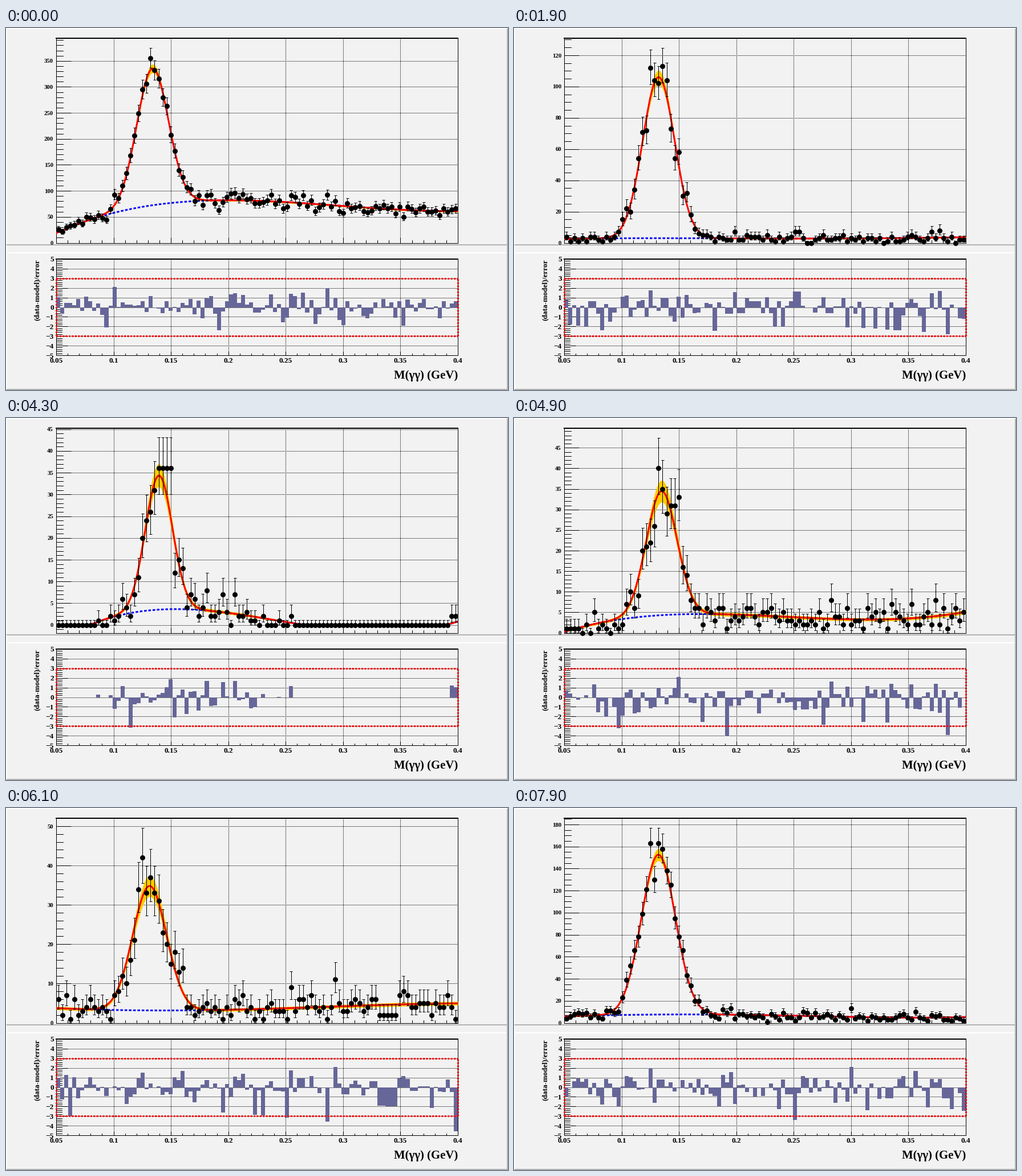
These frames come from a looping animation (880 px wide and 636 px high, 8000 ms). A matplotlib script:

```python
import matplotlib.pyplot as plt
import numpy as np
from matplotlib.animation import FuncAnimation
from matplotlib.patches import Rectangle

W, H, DPI = 880, 636, 100
PX = 72 / DPI
LEFT, RIGHT = 88, 792
TOP, BOTTOM = 18, 377.5
PULL_TOP, PULL_BOTTOM = 406, 575
XMIN, XMAX, BINS = 0.05, 0.4, 100
DOTS = (0, (1, 2))

# picture: tallest count, peak mean, width and height,
# then the background at five evenly spaced masses
FITS = {
    0: (355, 0.1340, 0.0138, 263, 19, 73.5, 81, 69, 61),
    7: (113, 0.1323, 0.0139, 103, 2.5, 3, 2.8, 2.9, 3.6),
    11: (48, 0.1392, 0.0141, 40.2, 1.6, 0.6, 0.1, 0.05, 0.2),
    15: (36, 0.1395, 0.0118, 30.8, -4, 3.5, 1.8, -1.5, 0.8),
    19: (45, 0.1303, 0.0150, 29.5, 4.5, 5.2, 6.5, 8, 9.4),
    23: (38, 0.1326, 0.0144, 33.8, 3, 1.1, 0.5, 0.7, 0.5),
    27: (163, 0.1321, 0.0148, 145, 6, 7.6, 7, 5.2, 5.3),
}

plt.rcParams["font.family"] = "Liberation Serif"
plt.rcParams["font.weight"] = "bold"
fig = plt.figure(figsize=(W / DPI, H / DPI), dpi=DPI, facecolor="#f2f2f2")
ax = fig.add_axes([0, 0, 1, 1])
ax.set(xlim=(0, W), ylim=(H, 0))
ax.axis("off")
top_frame = Rectangle((LEFT, TOP), RIGHT - LEFT, BOTTOM - TOP,
                      transform=ax.transData)

edges = np.linspace(XMIN, XMAX, BINS + 1)
centers = (edges[1:] + edges[:-1]) / 2
mass = np.linspace(XMIN, XMAX, 400)


def to_x(m):
    return LEFT + (np.asarray(m) - XMIN) / (XMAX - XMIN) * (RIGHT - LEFT)


def pull_y(v):
    return PULL_BOTTOM - (np.asarray(v) + 5) / 10 * (PULL_BOTTOM - PULL_TOP)


def line(x, y, width=1, color="black", z=2, **kw):
    return ax.plot(x, y, color=color, lw=width * PX, zorder=z,
                   dash_capstyle="butt", **kw)[0]


def grid_line(x, y):
    return line(x, y, ls=DOTS, z=1, antialiased=False)


def label(x, y, text, size, ha="right"):
    return ax.text(x, y, text, fontsize=size * PX, ha=ha, va="baseline")


def fit(picture):
    tallest, mean, sigma, height, *anchors = (
        np.interp(picture, list(FITS), column)
        for column in zip(*FITS.values()))
    poly = np.polyfit(np.arange(5), anchors, 4)

    def evaluate(m):
        background = np.polyval(poly, (m - XMIN) / (XMAX - XMIN) * 4)
        peak = np.exp(-((m - mean) / sigma) ** 2 / 2)
        error = (0.4 * np.sqrt(height) * peak
                 + 0.22 * np.sqrt(np.maximum(background, 0)))
        return background, background + height * peak, error

    return round(tallest), evaluate


def sample(picture, expected, tallest):
    rng = np.random.default_rng(100 + picture)
    counts = np.minimum(rng.poisson(expected), tallest)
    counts[counts.argmax()] = tallest
    return counts


def tick_step(span):
    power = 10 ** np.floor(np.log10(span / 10))
    step = next(s * power for s in (1, 2, 5, 10) if span / (s * power) <= 10)
    parts = 4 if round(step / power) == 2 else 5
    return step, parts


def draw_borders():
    light, shade = "white", "#b2b2b2"
    for x, y, w, h, color in ((0, 0, W, 2, light),
                              (0, 394, W, 2, light),
                              (0, 0, 2, H, light),
                              (1, 379.5, W - 1, 2, shade),
                              (1, H - 2, W - 1, 2, shade),
                              (W - 2, 1, 2, H, shade)):
        ax.add_patch(Rectangle((x, y), w, h, color=color, lw=0, zorder=0))


def draw_frame(top, bottom, major, minor):
    line([LEFT, RIGHT, RIGHT, LEFT, LEFT], [bottom, bottom, top, top, bottom])
    line([LEFT, RIGHT], [top, top], 2)
    for i in range(36):
        x = to_x(XMIN + i / 100)
        line([x, x], [bottom, bottom - (minor if i % 5 else major)])
        if i % 5 == 0 and 0 < i < 35:
            grid_line([x, x], [top, bottom])


def draw_static():
    draw_borders()
    draw_frame(TOP, BOTTOM, 9, 5)
    draw_frame(PULL_TOP, PULL_BOTTOM, 6, 3)

    for i in range(-25, 26):
        y = pull_y(i / 5)
        line([LEFT, LEFT + (10 if i % 5 else 20)], [y, y])
    for v in range(-5, 6):
        y = pull_y(v)
        if abs(v) < 5 and v:
            grid_line([LEFT, RIGHT], [y, y])
        label(84, y + 4.5, str(v).replace("-", "\u2212"), 13.4)
    line([LEFT, RIGHT], [pull_y(0)] * 2, color="#777777")
    for i in range(8):
        m = XMIN + 0.05 * i
        label(to_x(m), 587.5, f"{m:.2f}".rstrip("0"), 13.2, "center")

    box = {"width": 3, "color": "red", "z": 6, "ls": (0, (1, 0.8))}
    for v in (-3, 3):
        line([LEFT, RIGHT], [pull_y(v)] * 2, **box)
    for x in (LEFT, RIGHT):
        line([x, x], pull_y([-3, 3]), **box)

    label(RIGHT, 616, "M(\u03b3\u03b3) (GeV)", 20.8)
    ax.text(54.5, 460.5, "(data-model)/error", fontsize=13.4 * PX,
            rotation=90, ha="center", va="center")


def draw_axis(to_y, ymin, ymax):
    artists = []
    step, parts = tick_step(ymax - ymin)
    small = step / parts
    for i in range(int(np.ceil(ymin / small)), int(ymax / small) + 1):
        y = to_y(i * small)
        artists.append(line([LEFT, LEFT + (12 if i % parts else 25)], [y, y]))
        if i % parts == 0:
            artists += [grid_line([LEFT, RIGHT], [y, y]),
                        label(83, y + 3.6, f"{i * small:.0f}", 10.7)]
    return artists


def draw_curves(to_y, background, model, error):
    x, curve = to_x(mass), np.maximum(model, 0)
    artists = [
        ax.fill_between(x, to_y(curve - error), to_y(curve + error),
                        where=curve > 0, color="#ffcc00", lw=0, zorder=3),
        line(x, to_y(np.maximum(background, 0)), 3, "blue", 4,
             ls=(0, (1.5, 1))),
        line(x, to_y(curve), 3, "red", 5),
    ]
    for artist in artists:
        artist.set_clip_path(top_frame)
    return artists


def draw_points(to_y, counts, low, up):
    x = to_x(centers)
    bar = {"color": "black", "lw": PX, "zorder": 7}
    return [
        ax.vlines(x, to_y(up), to_y(low), **bar),
        ax.hlines(to_y(up), x - 2.5, x + 2.5, **bar),
        ax.hlines(to_y(low), x - 2.5, x + 2.5, **bar),
        ax.plot(x, to_y(counts), "o", color="black", ms=9 * PX, mew=0,
                zorder=8)[0],
    ]


def draw_pulls(counts, low, expected):
    seen = counts > 0
    pulls = np.where(seen, (counts - expected) / np.where(seen, counts - low, 1), 0)
    pulls[np.abs(pulls) > 5] = 0
    return ax.bar(to_x(centers), pull_y(pulls) - pull_y(0), 7.04,
                  bottom=pull_y(0), color="#666699", lw=0, zorder=3,
                  antialiased=False)


def draw_picture(picture):
    tallest, evaluate = fit(picture)
    background, model, error = evaluate(mass)
    expected = np.maximum(evaluate(centers)[1], 0)
    counts = sample(picture, expected, tallest)
    # Poisson intervals, one-sided for empty bins
    up = counts + np.where(counts > 0, 1 + np.sqrt(counts + 0.75), 1.147)
    low = counts - np.sqrt(np.maximum(counts - 0.25, 0))
    ymax = 1.05 * up.max()
    ymin = 1.05 * min(0, model[mass > 0.1].min())

    def to_y(v):
        return BOTTOM - (v - ymin) / (ymax - ymin) * (BOTTOM - TOP)

    return [*draw_axis(to_y, ymin, ymax),
            *draw_curves(to_y, background, model, error),
            *draw_points(to_y, counts, low, up),
            *draw_pulls(counts, low, expected)]


shown = []


def update(frame):
    while shown:
        shown.pop().remove()
    shown.extend(draw_picture((frame + 2) // 3))
    return shown


draw_static()
anim = FuncAnimation(fig, update, frames=80, interval=100,
                     init_func=lambda: [], blit=False, repeat=True,
                     repeat_delay=0)
plt.show()
```
